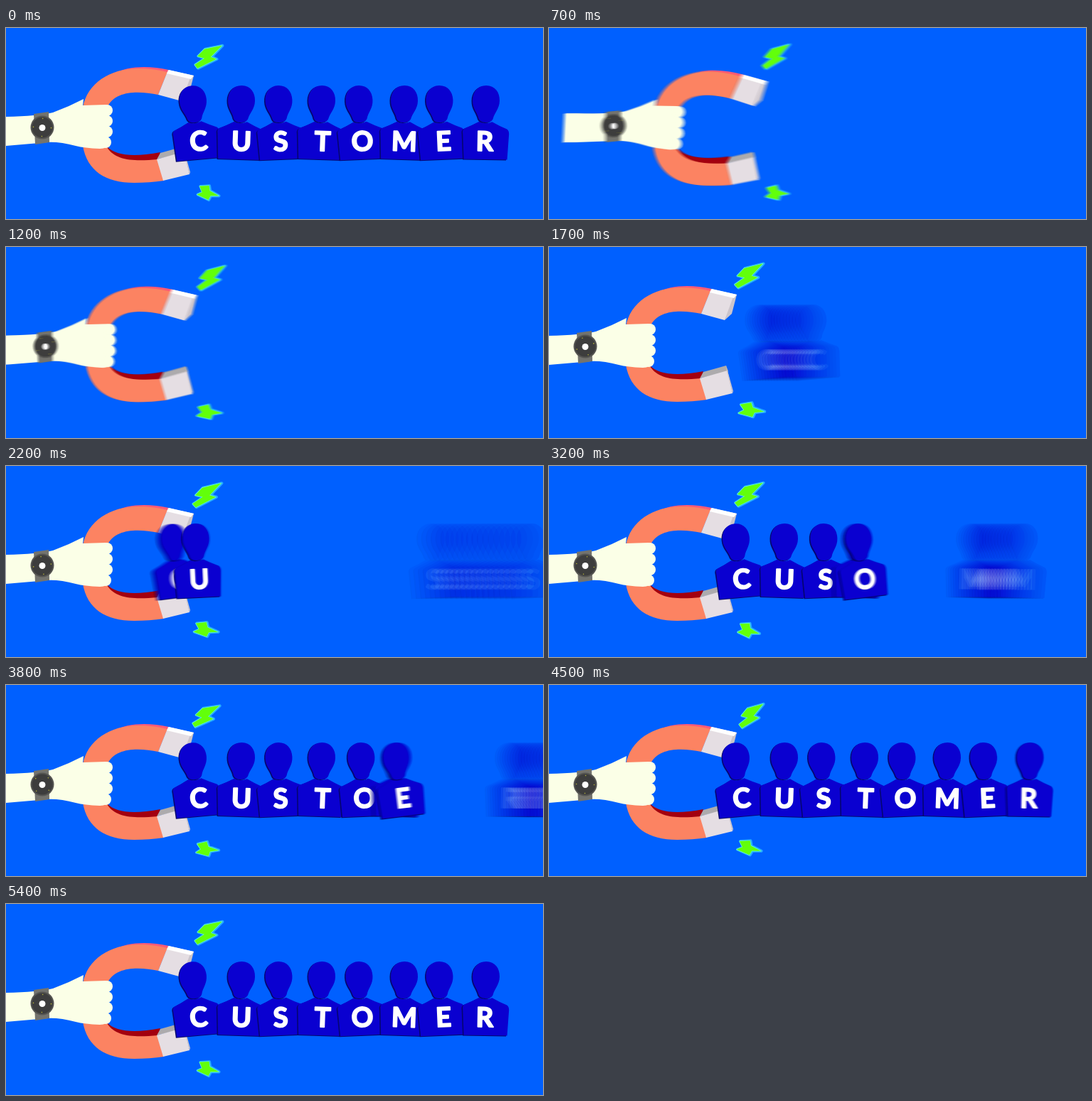
Animation, 755 px wide and 269 px high, one loop 5.5 s. Source, as an HTML page with a canvas:

```html
<!DOCTYPE html>
<html lang="en">
<head>
<meta charset="utf-8">
<title>Magnet</title>
<style>
  html, body { margin: 0; width: 100%; height: 100%; overflow: hidden; background: #0060ff; }
  canvas { display: block; width: 755px; height: 269px; }
</style>
</head>
<body>
<canvas id="stage" width="755" height="269"></canvas>
<script>
const W = 755, H = 269, LOOP = 5500, STEP = 100;
const SHUTTER = 50, SAMPLES = 20, SETTLED = 4900;
const stage = document.getElementById('stage').getContext('2d');
const buffer = document.createElement('canvas');
buffer.width = W;
buffer.height = H;
const g = buffer.getContext('2d');

const DEG = Math.PI / 180;
const clamp = v => Math.max(0, Math.min(1, v));
const progress = (t, from, to) => clamp((t - from) / (to - from));
const smooth = u => u * u * (3 - 2 * u);

// x: body centre, tilt in degrees, ink: letter offset
const people = [
  { letter: 'C', x: 268, tilt: -5, ink: 3 },
  { letter: 'U', x: 329, tilt: 2, ink: 2 },
  { letter: 'S', x: 386, tilt: -2.5, ink: 0 },
  { letter: 'T', x: 442, tilt: 2, ink: 3 },
  { letter: 'O', x: 499, tilt: -2.5, ink: 2 },
  { letter: 'M', x: 558, tilt: 2, ink: 2 },
  { letter: 'E', x: 612, tilt: -2.5, ink: 3 },
  { letter: 'R', x: 674, tilt: 1, ink: -1 }
];
const FIRST_PEAK = 1930, INTERVAL = 300;

function fill(color, path) {
  g.fillStyle = color;
  g.fill(path instanceof Path2D ? path : new Path2D(path));
}

function disc(x, y, r, color) {
  g.fillStyle = color;
  g.beginPath();
  g.arc(x, y, r, 0, 7);
  g.fill();
}

const bodyShape = new Path2D(
  'M-9 -28Q0 -24 9 -28Q20 -22 30 -18Q33 -16 33 -11L31 25L-30 25L-32 -11Q-33 -16 -30 -18Q-20 -22 -9 -28Z');
const headShape = new Path2D(
  'M0 -79C12 -79 19 -70 19 -58C19 -46 12 -41 10 -32Q8 -27 0 -27Q-8 -27 -10 -32C-12 -41 -19 -46 -19 -58C-19 -70 -12 -79 0 -79Z');

// Rushes in past its place, then swings back; sincePeak is the time after the far left point.
function pullOffset(sincePeak) {
  if (sincePeak < 0) return 340 * (-sincePeak / 330) ** 2.73 - 60;
  return -60 + 63 * smooth(progress(sincePeak, 0, 520)) - 3 * smooth(progress(sincePeak, 640, 900));
}

function drawShaded(shape) {
  g.save();
  g.translate(-1.5, 1);
  fill('#06066e', shape);
  g.restore();
  fill('#0a00d0', shape);
}

function drawPerson(p, index, t) {
  const offset = pullOffset(t - FIRST_PEAK - index * INTERVAL);
  if (p.x + offset > W + 50) return;

  g.save();
  g.translate(p.x + offset, 160);
  g.rotate((p.tilt + 0.08 * Math.min(0, offset)) * DEG);
  drawShaded(bodyShape);
  drawShaded(headShape);

  g.font = '700 38px Lato, sans-serif';
  g.textAlign = 'center';
  g.textBaseline = 'alphabetic';
  g.fillStyle = g.strokeStyle = '#fff';
  g.lineWidth = 2;
  g.lineJoin = 'round';
  g.fillText(p.letter, p.ink, 13);
  g.strokeText(p.letter, p.ink, 13);
  g.restore();
}

function drawMagnet() {
  // upper arm
  fill('#ff5a78', 'M150 65C172 53 200 53 229 59L226 66L170 62Z');
  fill('#fc8362', 'M108 112C114 78 146 57 186 57Q206 57 227 62L214 94C190 89 154 86 142 112Z');
  fill('#e5dee3', 'M228 59L264 67L247 103L214 94Z');
  fill('#cbc4cb', 'M264 67L257 94L247 103L259 70Z');
  fill('#fff', 'M229 59L264 67L260 72L226 64Z');
  // lower arm
  fill('#a3000f', 'M142 167C154 180 180 182 217 175L213 187Q165 193 144 175Z');
  fill('#fc8362', 'M108 166C114 201 140 218 180 218Q202 218 222 215L213 185C180 188 154 187 142 168Z');
  fill('#adabad', 'M217 176L249 167L252 175L212 185Z');
  fill('#e5dee3', 'M212 185L251 174L258 206L221 215Z');
  fill('#cbc4cb', 'M249 167L259 203L258 206L250 175Z');
}

function drawHand(t) {
  const skin = '#fbffe7';
  fill(skin, 'M-19 126L0 125Q45 124 66 119Q88 111 109 100L108 109L140 108Q146 110 145 120L144 160Q143 170 132 170Q110 169 98 166Q75 160 58 161L0 166L-19 167Z');
  [[142, 116], [142, 131], [142, 146], [140, 161]].forEach(([x, y]) => disc(x, y, 8, skin));

  fill('#73736e', 'M39 121L60 118L61 161L41 164Z');
  disc(51, 140, 16.5, '#555552');
  disc(51, 140, 14.5, '#3d3d3d');
  const turn = Math.floor(t / STEP) * 0.35;
  for (let i = 0; i < 4; i++) {
    const a = turn + i * Math.PI / 2;
    disc(51 + 12.5 * Math.cos(a), 140 + 12.5 * Math.sin(a), 0.8, '#b6b43c');
  }
  disc(51, 140.5, 4.5, '#fff');
}

const upperBolt = new Path2D('M21 -16L-4 -11L-14 -1L-4 2L-18 11L-14 16L13 3L5 0Z');
const lowerBolt = new Path2D('M-13 -8L2 -10L4 -3L19 3L6 4L3 10L-16 4L-8 0Z');

function drawBolt(shape, x, y, angle, stretch) {
  g.save();
  g.translate(x, y);
  g.rotate(angle);
  g.scale(stretch, 1);
  g.lineJoin = 'round';
  g.save();
  g.translate(1, 0);
  g.strokeStyle = 'rgba(50,200,255,0.75)';
  g.lineWidth = 4;
  g.stroke(shape);
  g.restore();
  g.strokeStyle = '#6dffc8';
  g.lineWidth = 1.2;
  g.stroke(shape);
  fill('#62ff0a', shape);
  g.restore();
}

function drawBolts(t) {
  const n = Math.floor(t / STEP);
  const wave = (rate, phase) => Math.sin(n * rate + phase);
  drawBolt(upperBolt, 281 + 2 * wave(2.1, 1), 42 + 2 * wave(1.7, 0), 0.07 * wave(1.3, 2), 0.98 + 0.08 * wave(2.6, 1));
  drawBolt(lowerBolt, 281 + 2 * wave(1.9, 0), 231 + 2 * wave(1.6, 2), 0.1 * wave(1.4, 1), 0.95 + 0.08 * wave(2.3, 0));
}

function handShift(t) {
  if (t < 850) return 50 - 390 * (1 - progress(t, 100, 850)) ** 2.3;
  return 50 * (1 - smooth(progress(t, 850, 1280)));
}

function drawScene(t, tick) {
  g.fillStyle = '#0060ff';
  g.fillRect(0, 0, W, H);
  const shift = handShift(t);
  g.save();
  g.translate(100 + shift, 130);
  g.rotate(0.00122 * Math.max(0, shift));
  g.translate(-100, -130);
  drawMagnet();
  drawHand(tick);
  g.restore();
  g.save();
  g.translate(shift * 0.9, 0);
  drawBolts(tick);
  g.restore();
  people.forEach((p, i) => drawPerson(p, i, t));
}

// Averages several moments across the shutter for motion blur.
function render(tick) {
  const count = tick < SETTLED ? SAMPLES : 1;
  for (let i = 0; i < count; i++) {
    const offset = count > 1 ? (i / (count - 1) - 0.5) * SHUTTER : 0;
    drawScene(tick + offset, tick);
    stage.globalAlpha = 1 / (i + 1);
    stage.drawImage(buffer, 0, 0);
  }
}

const start = performance.now();
let shown = -1;
function frame() {
  const now = Math.max(0, performance.now() - start) % LOOP;
  // The loop opens on its finished pose.
  const tick = Math.floor(now / STEP) * STEP || LOOP - STEP;
  if (tick !== shown) {
    shown = tick;
    render(tick);
  }
  requestAnimationFrame(frame);
}
frame();
</script>
</body>
</html>
```
